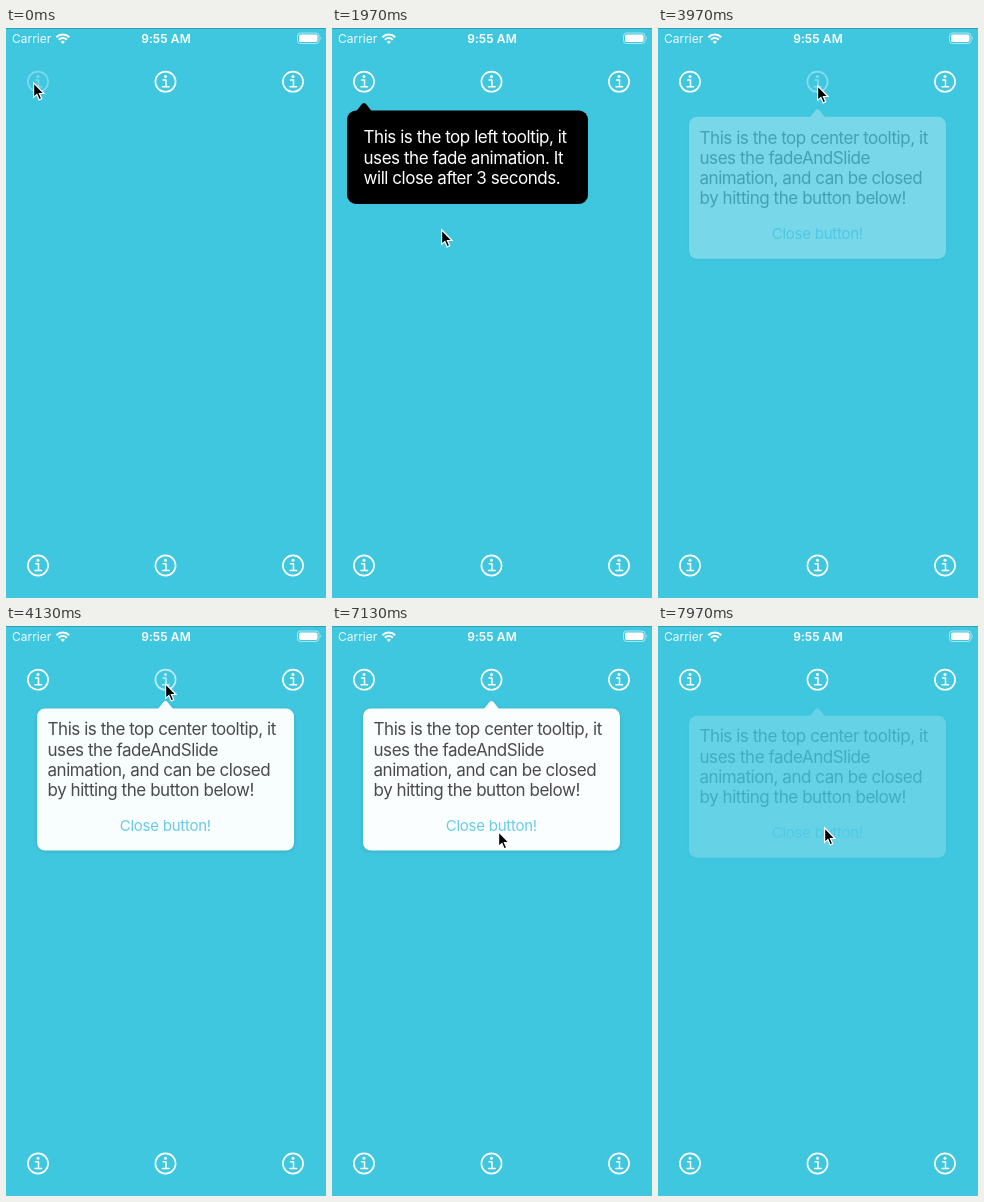
Write an HTML page that moves like this. It is 320 px wide and 570 px high and loops after 8 s.

```html
<!DOCTYPE html>
<html lang="en">
<head>
<meta charset="utf-8">
<title>Tooltips</title>
<style>
  html, body { margin: 0; width: 100%; height: 100%; overflow: hidden; background: #40c7e0; }
  svg { display: block; width: 100%; height: 100%; font-family: Inter, "Open Sans", sans-serif; }
  .body { font-size: 17px; letter-spacing: -.45px; }
  .close { font-size: 15px; letter-spacing: -.25px; fill: #6acbe9; }
  .status { font-size: 12px; fill: #fff; }
  .card { filter: drop-shadow(0 1px 2px rgba(0, 0, 0, .14)); }
</style>
</head>
<body>
<svg viewBox="0 0 320 570">
  <defs>
    <g id="info" fill="none" stroke="#fff" stroke-width="1.6">
      <circle r="10.1"/>
      <path d="M-2.4-1.7H.5V5M-3 5H3.6" stroke-width="1.5" stroke-linecap="round" stroke-linejoin="round"/>
      <circle cy="-5.2" r="1.5" fill="#fff" stroke="none"/>
    </g>
    <path id="arrow" d="M-8 8.5L-2.2 1.2Q0-1.2 2.2 1.2L8 8.5Z"/>
  </defs>
  <rect width="320" height="570" fill="#40c7e0"/>
  <rect width="320" height="1" fill="#000" opacity=".2"/>

  <g class="status">
    <text x="6" y="15" opacity=".9">Carrier</text>
    <text x="160" y="15" text-anchor="middle" font-weight="600" letter-spacing=".1">9:55 AM</text>
  </g>
  <g fill="none" stroke="#fff" stroke-width="2.1">
    <path d="M50.4 9.2A9 9 0 0 1 63.2 9.2M52.8 11.7A5.7 5.7 0 0 1 60.8 11.7"/>
    <path d="M56.8 16L54.7 13.7A3 3 0 0 1 58.9 13.7Z" fill="#fff" stroke="none"/>
  </g>
  <rect x="291.5" y="5" width="21.5" height="10.5" rx="3" fill="none" stroke="#fff" opacity=".55"/>
  <rect x="293" y="6.5" width="18.5" height="7.5" rx="1.7" fill="#fff"/>
  <path d="M314.2 8.6Q316 10.2 314.2 12Z" fill="#fff" opacity=".6"/>

  <g id="icons"></g>

  <g id="fadeTip">
    <use href="#arrow" x="32" y="75"/>
    <rect x="15" y="82.5" width="241" height="93.5" rx="9"/>
    <g class="body" fill="#fff">
      <text x="31.5" y="115.4">This is the top left tooltip, it</text>
      <text x="31.5" y="135.7">uses the fade animation. It</text>
      <text x="31.5" y="156">will close after 3 seconds.</text>
    </g>
  </g>

  <g id="slideTip">
    <g class="card" fill="#fbfeff">
      <use href="#arrow" x="159.5" y="75"/>
      <rect x="31" y="82.5" width="257" height="142" rx="8"/>
    </g>
    <g class="body" fill="#4a4a4a">
      <text x="41.5" y="109.2">This is the top center tooltip, it</text>
      <text x="41.5" y="129.5">uses the fadeAndSlide</text>
      <text x="41.5" y="149.8">animation, and can be closed</text>
      <text x="41.5" y="170.1">by hitting the button below!</text>
    </g>
    <text id="close" class="close" x="159.3" y="205" text-anchor="middle">Close button!</text>
  </g>

  <path id="cursor" d="M.6 .8V15.4L3.9 12.4L6.2 17.9L8.7 16.8L6.4 11.5H11Z" fill="#000" stroke="#fff" stroke-width="1.2"/>
</svg>
<script>
const LOOP = 8000, SLIDE = 9, PRESSED = .33;
const $ = id => document.getElementById(id);

for (const y of [53.7, 537.5])
  for (const x of [32, 159.5, 287])
    $('icons').insertAdjacentHTML('beforeend', `<use href="#info" x="${x}" y="${y}"/>`);
const [leftIcon, centerIcon] = $('icons').children;

const ramp = (t, start, end) => {
  const p = Math.min(1, Math.max(0, (t - start) / (end - start)));
  return p * p * (3 - 2 * p);
};
const mix = (a, b, p) => a + (b - a) * p;

// Time, x and y of the pointer tip
const path = [
  [0, 27, 54], [250, 27, 54], [800, 109, 201], [2980, 109, 201],
  [3100, 114, 181], [3370, 114, 181], [3400, 115, 176], [3800, 159, 57],
  [6200, 159, 57], [6320, 160, 51], [7030, 166, 210], [7060, 166, 209],
  [7130, 166, 205], [7250, 166, 201], [LOOP, 166, 201]
];

function pointer(t) {
  const i = path.findIndex(([end]) => end > t);
  const [t0, x0, y0] = path[i - 1], [t1, x1, y1] = path[i];
  const p = ramp(t, t0, t1);
  return [mix(x0, x1, p), mix(y0, y1, p)];
}

function draw(t) {
  leftIcon.style.opacity = mix(PRESSED, 1, ramp(t, 20, 500));
  centerIcon.style.opacity = 1 - (1 - PRESSED) * (ramp(t, 3770, 3840) - ramp(t, 3890, 4370));

  $('fadeTip').style.opacity = ramp(t, 20, 300) - ramp(t, 2970, 3100);

  const shown = ramp(t, 3870, 4150) - ramp(t, 7800, 8040);
  $('slideTip').style.opacity = shown;
  $('slideTip').setAttribute('transform', `translate(0 ${SLIDE * (1 - shown)})`);
  $('close').style.opacity = 1 - .7 * (ramp(t, 7330, 7470) - ramp(t, 7800, 8100));

  $('cursor').setAttribute('transform', `translate(${pointer(t)})`);
}

const start = performance.now();
(function tick() {
  draw((performance.now() - start) % LOOP);
  requestAnimationFrame(tick);
})();
</script>
</body>
</html>
```
